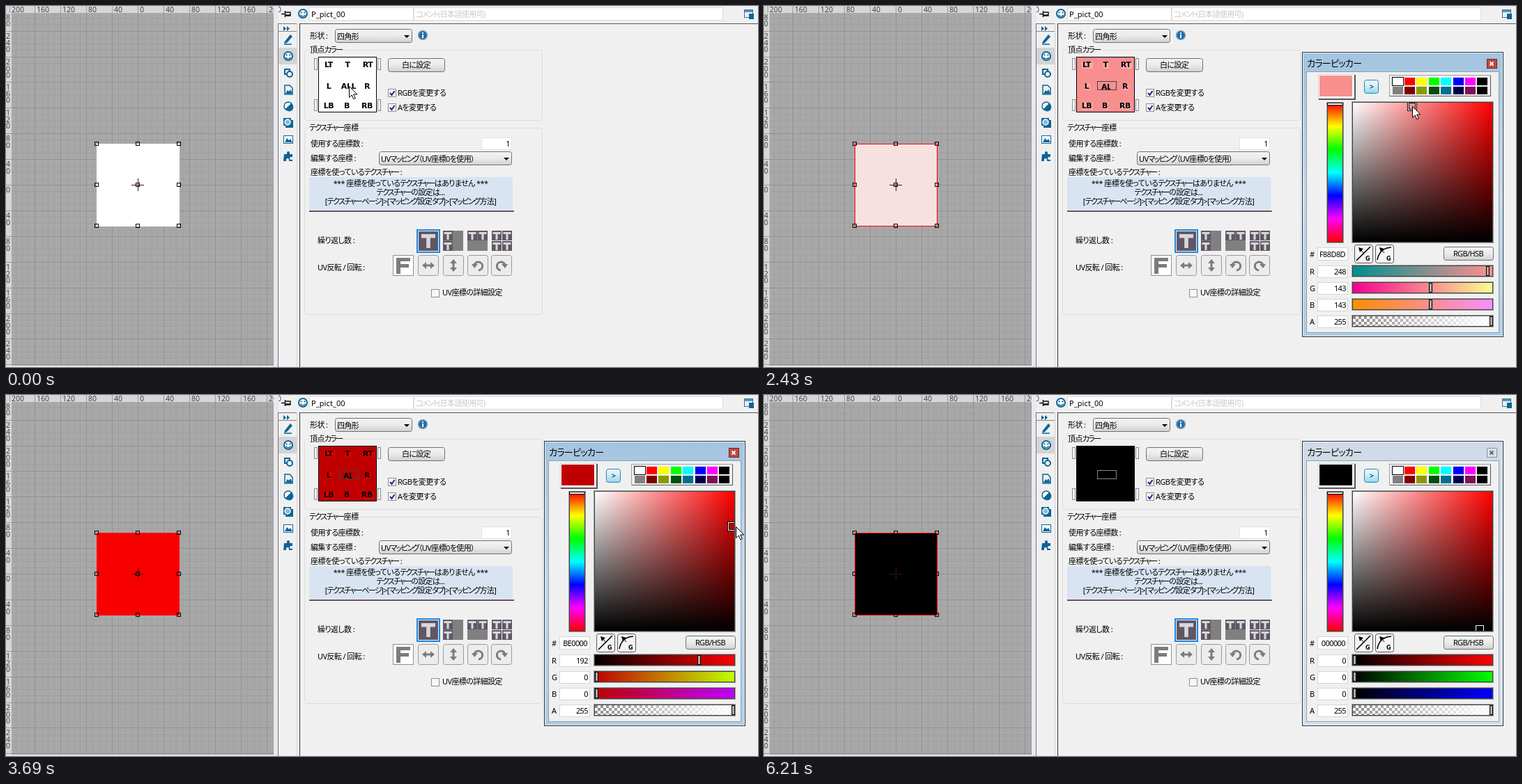
Animation of 1079x519 px, one loop 6440 ms. Source, as an HTML page:

```html
<!DOCTYPE html>
<html lang="ja">
<head>
<meta charset="utf-8">
<title>Vertex colour picker</title>
<style>
html, body { margin: 0; width: 100%; height: 100%; overflow: hidden; background: #f0f0f0; }
svg { display: block; width: 100%; height: 100%; }
text { font: 11px "Noto Sans", "Noto Sans CJK JP", "Noto Sans CJK", sans-serif; font-feature-settings: "palt"; letter-spacing: -.6px; white-space: pre; }
.kana { letter-spacing: -1.6px; }
.wide { letter-spacing: .1px; }
.title { font-size: 13px; letter-spacing: -.7px; }
.bold { font: bold 11px "DejaVu Sans", sans-serif; letter-spacing: -.4px; }
.ruler { font-size: 10.5px; fill: #444; letter-spacing: 0; }
.tiny { font: bold 8px "DejaVu Sans", sans-serif; }
rect, .crisp { shape-rendering: crispEdges; }
.soft { shape-rendering: auto; }
</style>
</head>
<body>
<svg id="stage" viewBox="0 0 1079 519" preserveAspectRatio="none"></svg>
<script>
const LOOP = 6440, BLUE = '#0b6596';
const stage = document.getElementById('stage');

// Markup helpers
const fill = (x, y, w, h, color, more = '') => `<rect x="${x}" y="${y}" width="${w}" height="${h}" fill="${color}" ${more}/>`;
const box = (x, y, w, h, color, stroke, more = '') =>
  fill(x + .5, y + .5, w - 1, h - 1, color, `stroke="${stroke}" ${more}`);
const path = (d, stroke, width = 1, more = '') => `<path d="${d}" fill="none" stroke="${stroke}" stroke-width="${width}" ${more}/>`;
const shape = (d, color, more = '') => `<path d="${d}" fill="${color}" ${more}/>`;
const circle = (x, y, r, color, more = '') => `<circle cx="${x}" cy="${y}" r="${r}" fill="${color}" ${more}/>`;
const text = (x, y, s, more = '') => `<text x="${x}" y="${y}" ${more}>${s}</text>`;
const jp = (x, y, s, more) => text(x, y, s.replace(/[ァ-ヶー]+/g, k => `<tspan class="kana">${k}</tspan>`), more);
const at = (x, y, s) => `<g transform="translate(${x} ${y})">${s}</g>`;
const gradient = (id, colors, vertical) => `<linearGradient id="${id}" x2="${vertical ? 0 : 1}" y2="${vertical ? 1 : 0}">` +
  colors.map((c, i) => `<stop offset="${i / (colors.length - 1)}" stop-color="${c}"/>`).join('') + '</linearGradient>';
const MID = 'text-anchor="middle"', END = 'text-anchor="end"', ROUND = 'rx="3" class="soft"';

const button = (x, y, w, h) => box(x, y, w, h, 'url(#button)', '#707070', ROUND);
const sunken = (x, y, w, h) => box(x, y, w, h, '#fff', '#a0a0a0') + box(x + 1, y + 1, w - 2, h - 2, '#fff', '#444');
const combo = (x, y, w, label) => button(x, y, w, 20) + jp(x + 3, y + 14.5, label) +
  shape(`M${x + w - 12} ${y + 9}h8l-4 4z`, '#000');
const checkbox = (x, y, on) => box(x, y, 12, 12, '#f6f6f6', '#8e8f8f') +
  (on ? path(`M${x + 3} ${y + 6}l2.5 3l4-6`, '#1c2f7d', 2) : '');
const smiley = (x, y, r) => circle(x, y, r, '#fff', `stroke="${BLUE}" stroke-width="2"`) +
  circle(x - 2.4, y - 1.6, 1.1, BLUE) + circle(x + 2.4, y - 1.6, 1.1, BLUE) +
  path(`M${x - 3.6} ${y + 1.6}q3.6 4.6 7.2 0`, BLUE, 1.4);

function viewport() {
  const cx = 189, cy = 257, step = 36.9, minor = step / 4;
  const lines = (gap, reach) => {
    let d = '';
    for (let i = -reach; i <= reach; i++) {
      const x = Math.round(cx + i * gap) + .5, y = Math.round(cy + i * gap) + .5;
      if (x > 8 && x < 384) d += `M${x} 10V517`;
      if (y > 10 && y < 517) d += `M8 ${y}H384`;
    }
    return d;
  };
  let out = fill(0, 0, 384, 519, '#a8a8a8') + path(lines(minor, 30), '#a0a0a0', 1, 'class="crisp"') +
    path(lines(step, 8), '#929292', 1, 'class="crisp"') + fill(0, 0, 384, 10, '#d6d6d6') + fill(0, 0, 8, 517, '#d6d6d6');
  for (let i = -7; i <= 7; i++) {
    const x = Math.round(cx + i * step), y = Math.round(cy + i * step), label = String(Math.abs(i) * 40);
    if (Math.abs(i) < 6) out += fill(x, 0, 1, 10, '#9a9a9a') + text(x + 3, 8.5, label, 'class="ruler"');
    out += fill(0, y, 8, 1, '#9a9a9a');
    [...label].forEach((c, k) => { if (y + k * 9 > 3) out += text(0, y + 11 + k * 9.5, c, 'class="ruler"'); });
  }
  let handles = '';
  for (const x of [130, 189, 248]) for (const y of [198, 257, 316]) handles += box(x - 3, y - 3, 6, 6, 'none', '#000');
  return out + fill(130, 198, 119, 119, '#fff', 'id="quad"') +
    `<g id="outline">${box(130, 198, 119, 119, 'none', '#f00')}</g>` +
    path('M180 257.5h18M189.5 248v18', '#4a1018', 1, 'class="crisp"') + handles +
    fill(384, 0, 7, 519, '#e9e8f0') + fill(0, 517, 391, 2, '#e6e6ee') + fill(390, 25, 1, 494, '#777');
}

function toolbar() {
  const pen = shape('M-5 3L3-7l3 3-8 9-4 1z', BLUE) + path('M-6 7h11', BLUE, 1.5);
  const shapes = box(-6, -6, 8, 8, 'none', BLUE, 'stroke-width="2"') + circle(2, 2, 4, '#f0f0f0', `stroke="${BLUE}" stroke-width="2"`);
  const page = path('M-5-6h7l4 4v9h-11z', BLUE, 1.5) + shape('M-4 6l3-5 2 2 2-3 3 6z', BLUE);
  const contrast = circle(0, 0, 6, '#fff', `stroke="${BLUE}" stroke-width="1.5"`) + shape('M4-4A6 6 0 1 1-4 4z', BLUE);
  const sphere = fill(-4, -4, 11, 11, BLUE) + fill(-7, -7, 11, 11, BLUE) + circle(-1, -1, 4, '#8fb9d3', 'stroke="#fff" stroke-width="1.5"');
  const picture = box(-7, -6, 14, 12, '#fff', BLUE) + shape('M-5 4l3-6 3 3 2-2 3 5z', BLUE);
  const puzzle = shape('M-6-3h4v-2a2 2 0 0 1 4 0v2h4v4h-2a1.8 1.8 0 0 0 0 4h2v2h-5v-2a2 2 0 0 0-4 0v2h-4z', BLUE);
  const icons = [pen, smiley(0, 0, 6), shapes, page, contrast, sphere, picture, puzzle];
  return fill(391, 25, 27, 203, '#f0f0f0') + fill(391, 60, 27, 24, '#d4d4d4') +
    fill(391, 25, 27, 1, '#777') + fill(391, 36, 27, 1, '#888') + fill(417, 25, 1, 494, '#d8d8d8') +
    shape('M398 29l4 3.5-4 3.5zM403 29l4 3.5-4 3.5z', BLUE) +
    icons.map((icon, i) => at(405, 48 + 24 * i, icon)).join('') +
    fill(421, 25, 658, 1, '#555') + fill(421, 25, 1, 494, '#333') +
    path('M395 11.5h5M400.5 7v9M401 9h7v5h-7M401 13h7', '#111', 1.4) + smiley(426, 11, 6) +
    box(435, 2, 150, 19, '#fff', '#ddd') + text(438, 15.5, 'P_pict_00', 'class="wide"') +
    box(585, 2, 444, 19, '#fff', '#ddd') + jp(588, 15.5, 'コメント(日本語使用可)', 'fill="#c8c8c8"') +
    box(1059, 5, 13, 12, '#e8f1f8', '#456b8a') + fill(1060, 6, 11, 3, '#5b94bd') + fill(1066, 11, 7, 8, BLUE);
}

function vertexGroup() {
  const labels = [['LT', 463, 88], ['T', 490, 88], ['RT', 519, 88], ['L', 463, 119], ['R', 518, 119],
    ['LB', 463, 147], ['B', 489, 147], ['RB', 518, 147]];
  return box(428, 63, 342, 102, 'none', '#dcdcdc', ROUND) + fill(434, 58, 48, 12, '#f0f0f0') +
    jp(436, 47, '形状 :') + combo(472, 33, 111, '四角形') +
    circle(598, 42, 6.5, '#1e6fae', 'stroke="#8fa6b8" stroke-width="1.5"') + fill(597, 41, 2, 5, '#fff') + fill(597, 38, 2, 2, '#fff') +
    jp(436, 67, '頂点カラー') +
    box(448, 73, 84, 80, '#fff', '#000', 'id="vertex"') +
    [442, 533].map(x => [75, 134].map(y => box(x, y, 5, 17, '#f8f8f8', '#8a8a8a')).join('')).join('') +
    `<g id="labelBack">${labels.map(([s, x, y]) => fill(x - s.length * 4 + 1, y - 8, s.length * 8, 10, 'inherit')).join('')}</g>` +
    labels.map(([s, x, y]) => text(x, y, s, `class="bold" ${MID}`)).join('') +
    text(491.5, 119, 'ALL', `class="bold" ${MID} id="all"`) +
    `<g id="pressed">${box(478, 108, 28, 13, 'none', '#444', 'id="pressedBox"')}<svg x="484" y="109" width="13" height="11">` +
    text(0, 11, 'ALL', 'class="bold"') + '</svg></g>' +
    button(548, 75, 82, 20) + jp(588.5, 89, '白に設定', MID) +
    checkbox(548, 119, 1) + jp(562, 129, 'RGBを変更する') + checkbox(548, 140, 1) + jp(562, 150, 'Aを変更する');
}

function textureGroup() {
  const dark = '#5f5765', pale = '#d9d6da';
  const tee = (x, y, s) => shape(`M${x} ${y}h${s}v${s * .27}h${-s * .36}v${s * .73}h${-s * .28}v${-s * .73}h${-s * .36}z`, pale);
  const cell = (x, y) => fill(x, y, 14, 14, dark) + tee(x + 1.5, y + 2, 11);
  const flip = '<g fill="#7c7c7c"><path d="M-6 0H6" stroke="#7c7c7c" stroke-width="3"/><path d="M-9 0l6-5v10zM9 0l-6-5v10z"/></g>';
  const turn = path('M-5-1A6 6 0 1 1 1 7', '#7c7c7c', 3) + shape('M-9-2h9l-5 6z', '#7c7c7c');
  const tools = [flip, `<g transform="rotate(90)">${flip}</g>`, turn, `<g transform="scale(-1 1)">${turn}</g>`];
  return box(428, 175, 342, 269, 'none', '#dcdcdc', ROUND) + fill(433, 169, 71, 12, '#f0f0f0') + jp(435, 179, 'テクスチャー座標') +
    jp(437, 202, '使用する座標数 :') + box(682, 189, 44, 18, '#fff', '#e2e2e2') + text(723, 202, '1', END) +
    jp(437, 223, '編集する座標 :') + combo(535, 209, 191, 'UVマッピング（UV座標0を使用）') +
    jp(437, 243, '座標を使っているテクスチャー :') + fill(435, 246, 292, 47, '#d8e4f2') + fill(435, 294, 294, 2, '#63565a') +
    ['*** 座標を使っているテクスチャーはありません ***', 'テクスチャーの設定は...', '[テクスチャーページ]>[マッピング設定タブ]>[マッピング方法]']
      .map((s, i) => jp(580.5, 259 + 13 * i, s, MID)).join('') +
    jp(447, 341, '繰り返し数 :') + fill(589, 321, 34, 34, '#1e86e0') + fill(591, 323, 30, 30, '#eaf3fc') +
    fill(592, 324, 28, 28, dark) + tee(596, 328, 20) +
    fill(627, 323, 29, 29, '#808080') + cell(627, 323) + cell(627, 338) +
    fill(662, 323, 29, 29, '#808080') + cell(662, 323) + cell(677, 323) +
    [697, 712].map(x => cell(x, 323) + cell(x, 338)).join('') +
    jp(447, 380, 'UV反転 / 回転 :') + box(555, 358, 30, 30, '#fff', '#909090') +
    shape('M560 362h20v5h-14v4h12v5h-12v9h-6z', '#7c7c7c') +
    tools.map((icon, i) => box([591, 627, 662, 696][i], 358, 30, 30, '#ececec', '#999', ROUND) +
      at([606, 642, 677, 711][i], 373, icon)).join('') +
    checkbox(610, 407) + jp(626, 416, 'UV座標の詳細設定');
}

const CHANNELS = ['R', 'G', 'B', 'A'];
function picker() {
  const swatches = ['#fff red #ff0 lime cyan blue #f0f #000'.split(' '),
    '#808080 #800000 #8a9a00 #00500f #007090 #000050 #80105a #000'.split(' ')];
  const slider = (name, i) => {
    const y = 372 + 24 * i;
    return text(783, y + 13.5, name) + box(794, y + 1, 44, 18, '#fff', '#d5d5d5') + text(835, y + 14, '255', `${END} id="value${name}"`) +
      sunken(843, y, 204, 18) + (name === 'A' ? fill(845, y + 2, 200, 14, 'url(#checker)') : '') +
      fill(845, y + 2, 200, 14, `url(#track${name})`) +
      `<g id="knob${name}">${box(-2, y + 2, 5, 14, '#aaa', '#000')}</g>`;
  };
  return '<g id="picker">' + box(772, 66, 289, 410, 'url(#frame)', '#26323e', 'id="window"') +
    box(773, 67, 287, 408, 'none', '#e6f0f8') + text(779, 87, 'カラーピッカー', 'class="title"') +
    box(1037, 76, 15, 14, '#c4473c', '#6b2a25', 'id="close"') + path('M1041.5 80.5l5 5m0-5l-5 5', '#fff', 1.8, 'id="cross"') +
    box(778, 94, 277, 376, '#f0f0f0', '#8ba0b2') +
    box(795, 98, 53, 36, '#fff', '#d0d0d0') + path('M847.5 99v34.5H796', '#555', 2, 'class="crisp"') +
    fill(797, 100, 47, 30, '#fff', 'id="swatch"') +
    box(861, 106, 21, 20, 'url(#glow)', '#2e7fa3', ROUND) + text(871.5, 120, '&gt;', MID) +
    box(897, 99, 146, 31, '#f0f0f0', '#a0a0a0') + path('M1042.5 100v29.5H898', '#555', 1, 'class="crisp"') +
    swatches.map((row, r) => row.map((c, i) => fill(Math.round(901.5 + i * 17.4), 103 + r * 13, 15, 11, c)).join('')).join('') +
    box(901, 102, 17, 13, '#fff', '#000') +
    sunken(807, 138, 25, 203) + fill(809, 140, 21, 199, 'url(#hue)') + box(808, 139, 23, 4, '#fff', '#000') +
    sunken(843, 137, 204, 204) + fill(845, 139, 200, 200, 'url(#sat)') + fill(845, 139, 200, 200, 'url(#dark)') +
    `<svg x="845" y="139" width="200" height="200"><g id="marker">${box(-7, -7, 14, 14, 'none', '#000')}` +
    `${box(-6, -6, 12, 12, 'none', '#fff')}${box(-5, -5, 10, 10, 'none', '#000')}</g></svg>` +
    text(783, 360.5, '#') + box(794, 347, 44, 19, '#fff', '#d5d5d5') + text(834, 361, 'FFFFFF', `${END} id="hex"`) +
    [847, 877].map((x, i) => box(x, 343, 27, 27, '#f4f4f4', '#555', ROUND) +
      path(i ? `M${x + 3} 365q3-17 20-18` : `M${x + 3} 366l20-20`, '#000', 1.6) +
      shape(`M${x + 6} 347l7 2-5 5z`, '#000') + path(`M${x + 9} 350l4 5`, '#000') +
      text(x + 16, 366, 'G', 'class="tiny"')).join('') +
    button(975, 346, 72, 20) + text(1010.5, 359.5, 'RGB/HSB', MID) + CHANNELS.map(slider).join('') + '</g>';
}

const defs = '<defs>' + gradient('button', ['#f3f3f3', '#ebebeb', '#d0d0d0'], 1) + gradient('glow', ['#eefaff', '#c9ecfa', '#8fd8f3'], 1) +
  gradient('frame', ['#a3c4e0', '#c3d9ec', '#aecde6'], 1) + gradient('frameOff', ['#cfdae6', '#dce5ef', '#d5e0eb'], 1) +
  gradient('hue', ['red', 'yellow', 'lime', 'cyan', 'blue', 'magenta', 'red'], 1) +
  gradient('sat', ['#fff', '#f00']) + gradient('dark', ['rgba(0,0,0,0)', '#000'], 1) +
  CHANNELS.map(c => gradient('track' + c, ['rgba(255,255,255,0)', '#fff'])).join('') +
  '<pattern id="checker" x="845" y="446" width="8" height="8" patternUnits="userSpaceOnUse">' +
  fill(0, 0, 8, 8, '#fff') + fill(0, 0, 4, 4, '#918a8a') + fill(4, 4, 4, 4, '#918a8a') + '</pattern></defs>';

stage.innerHTML = defs + fill(0, 0, 1079, 519, '#f0f0f0') + viewport() + toolbar() + vertexGroup() + textureGroup() + picker() +
  `<g id="cursor">${shape('M.5.5v16l3.7-3.5 2.6 5.8 2.5-1.1-2.6-5.7h5.2z', '#fff', 'stroke="#000"')}</g>`;

const ui = {};
stage.querySelectorAll('[id]').forEach(node => { ui[node.id] = node; });
const stops = CHANNELS.slice(0, 3).map(c => ui['track' + c].querySelectorAll('stop'));

// Pointer path: time, x, y
const PATH = [[0, 492, 115], [470, 492, 115], [900, 755, 153], [1080, 847, 150], [1240, 847, 145], [1550, 847, 145],
  [1790, 848, 145], [2030, 854, 145.4], [2670, 975, 143.6], [3090, 1042, 142.5], [3300, 1049, 144], [3450, 1048, 145],
  [4090, 1045, 260.6], [4170, 1040, 276], [4590, 1030, 345], [4810, 1027, 358], [5350, 1027, 358], [5600, 1037, 440], [5820, 1030, 522]];
const QUAD_LAG = 350, LABEL_LAG = 120;
const clamp = (v, lo, hi) => Math.min(hi, Math.max(lo, v));

function pointer(t) {
  const i = PATH.findIndex(p => p[0] > t);
  if (i < 0) return PATH[PATH.length - 1].slice(1);
  const [a, b] = [PATH[i - 1], PATH[i]], k = (t - a[0]) / (b[0] - a[0]);
  return [a[1] + (b[1] - a[1]) * k, a[2] + (b[2] - a[2]) * k];
}
function pick(t) {
  if (t < 1550) return [0, 0];
  const [x, y] = pointer(Math.min(t, 4890));
  return [clamp(x - 845, 0, 200), clamp(y - 139, 0, 200)];
}
function colorAt(t) {
  const [x, y] = pick(t), value = 255 * (1 - y / 200), rest = Math.round(value * (1 - x / 200));
  return [Math.round(value), rest, rest];
}
const css = rgb => `rgb(${rgb})`;
const move = (node, x, y) => node.setAttribute('transform', `translate(${x} ${y})`);

function draw(t) {
  const rgb = colorAt(t), open = t >= 80, active = t < 6210;
  const [px, py] = pointer(t), [mx, my] = pick(t);
  move(ui.cursor, Math.round(px), Math.round(py));
  move(ui.marker, Math.round(Math.min(mx, 197)), Math.round(Math.min(my, 198)));
  ui.quad.setAttribute('fill', css(colorAt(t - QUAD_LAG)));
  ui.vertex.setAttribute('fill', css(rgb));
  ui.swatch.setAttribute('fill', css(rgb));
  ui.labelBack.setAttribute('fill', css(colorAt(t - LABEL_LAG)));
  ui.outline.style.display = ui.pressed.style.display = open ? '' : 'none';
  ui.all.style.display = open ? 'none' : '';
  ui.pressedBox.setAttribute('stroke', rgb[0] < 150 ? '#888' : '#444');
  ui.picker.style.opacity = clamp((t - 80) / 150, 0, 1);
  ui.window.setAttribute('fill', active ? 'url(#frame)' : 'url(#frameOff)');
  ui.close.setAttribute('fill', active ? '#c4473c' : '#d8e1ea');
  ui.close.setAttribute('stroke', active ? '#6b2a25' : '#8694a2');
  ui.cross.setAttribute('stroke', active ? '#fff' : '#5c6670');
  ui.hex.textContent = colorAt(t + 10).map(v => v.toString(16).padStart(2, '0')).join('').toUpperCase();
  [...rgb, 255].forEach((v, i) => {
    const name = CHANNELS[i];
    ui['value' + name].textContent = v;
    move(ui['knob' + name], Math.round(clamp(845 + v / 255 * 198, 847, 1043)), 0);
    if (i < 3) [0, 255].forEach((edge, k) => stops[i][k].setAttribute('stop-color', css(rgb.map((c, j) => j === i ? edge : c))));
  });
}

const start = performance.now();
function tick() {
  draw((performance.now() - start) % LOOP);
  requestAnimationFrame(tick);
}
tick();
</script>
</body>
</html>
```
